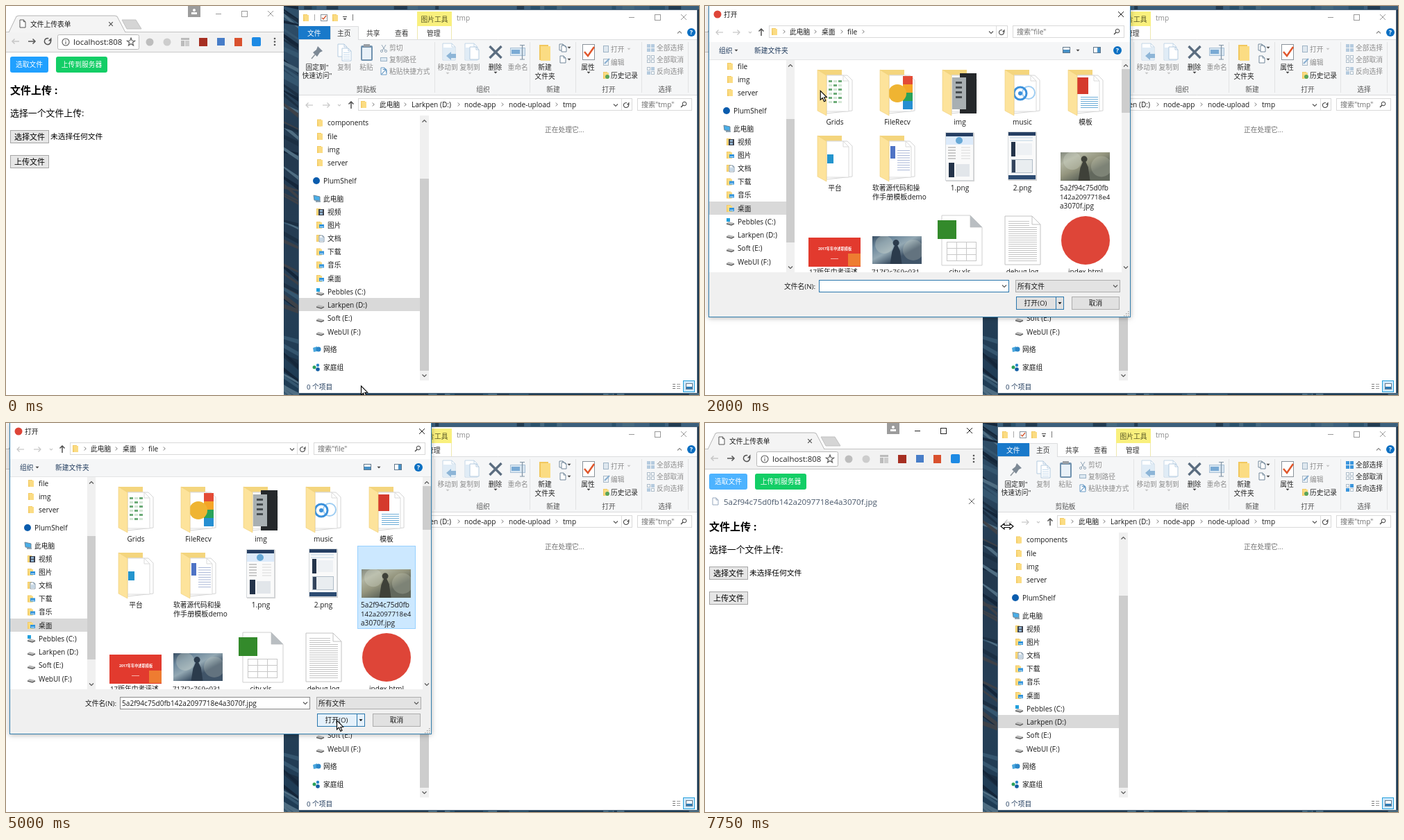
These frames come from a looping animation (998x561 px, 8000 ms). An HTML page with a canvas:

```html
<!DOCTYPE html>
<html lang="zh-CN">
<head>
<meta charset="utf-8">
<title>文件上传表单</title>
<style>
html, body { margin: 0; width: 100%; height: 100%; overflow: hidden; background: #fff; }
canvas { display: block; }
</style>
</head>
<body>
<canvas id="stage" width="998" height="561"></canvas>
<script>
const g = document.getElementById('stage').getContext('2d');
const LOOP = 8000, STEP = 250;
const FONT = '"Open Sans", "Noto Sans CJK SC", "Noto Sans CJK", sans-serif';
const DARK = '#1a1a1a', GREY = '#8c8c8c', PALE = '#c6c6c6', BLUE = '#1979ca', GOLD = '#fbdc83', FOCUS = '#2a77ad';
const FILE = '5a2f94c75d0fb142a2097718e4a3070f.jpg';

// --- drawing helpers ---
function rect(x, y, w, h, fill, stroke) {
  if (fill) { g.fillStyle = fill; g.fillRect(x, y, w, h); }
  if (stroke) { g.strokeStyle = stroke; g.lineWidth = 1; g.strokeRect(x + .5, y + .5, w - 1, h - 1); }
}
function round(x, y, w, h, r, fill, stroke) {
  g.beginPath(); g.roundRect(x, y, w, h, r);
  g.fillStyle = fill; g.fill();
  if (stroke) { g.strokeStyle = stroke; g.lineWidth = 1; g.stroke(); }
}
function trace(pts) {
  g.beginPath();
  for (let i = 0; i < pts.length; i += 2) g.lineTo(pts[i], pts[i + 1]);
}
function poly(pts, fill, stroke, w = 1) {
  trace(pts); g.closePath();
  if (fill) { g.fillStyle = fill; g.fill(); }
  if (stroke) { g.strokeStyle = stroke; g.lineWidth = w; g.stroke(); }
}
function line(pts, color, w = 1) {
  trace(pts); g.strokeStyle = color; g.lineWidth = w; g.stroke();
}
function disc(x, y, r, fill, stroke, w = 1) {
  g.beginPath(); g.arc(x, y, r, 0, 7);
  if (fill) { g.fillStyle = fill; g.fill(); }
  if (stroke) { g.strokeStyle = stroke; g.lineWidth = w; g.stroke(); }
}
// y is the vertical middle of the glyphs
function text(s, x, y, color = DARK, align = 'left', size = /[a-z]{2}/i.test(s) ? 10.1 : 9.75, weight = 400) {
  g.font = `${weight} ${size}px ${FONT}`;
  g.textAlign = align; g.fillStyle = color;
  g.fillText(s, x, y + size * .37);
}
function clip(x, y, w, h, draw) {
  g.save(); g.beginPath(); g.rect(x, y, w, h); g.clip(); draw(); g.restore();
}
function shade(x, y, w, h, ...colors) {
  const f = g.createLinearGradient(x, y, x + w * .3, y + h);
  colors.forEach((c, i) => f.addColorStop(i / (colors.length - 1), c));
  rect(x, y, w, h, f);
}
function seeded(n) {
  return () => (n = (n * 16807) % 2147483647) / 2147483647;
}

// --- small signs ---
const right = (x, y, c = '#777', s = 2.5) => line([x - s / 2, y - s, x + s / 2, y, x - s / 2, y + s], c);
const down = (x, y, c = '#555', s = 3) => line([x - s, y - s / 2, x, y + s / 2, x + s, y - s / 2], c, 1.1);
const up = (x, y, c = '#555') => down(x, y, c, -3);
const caret = (x, y, c = '#444') => poly([x - 2.5, y - 1.2, x + 2.5, y - 1.2, x, y + 1.6], c);
const cross = (x, y, s, c, w = 1) => { line([x - s, y - s, x + s, y + s], c, w); line([x + s, y - s, x - s, y + s], c, w); };
function arrow(x, y, dir, c, w = 1.2) {
  g.save(); g.translate(x, y); g.rotate(dir);
  line([-5, 0, 5, 0], c, w); line([1.5, -3.5, 5, 0, 1.5, 3.5], c, w);
  g.restore();
}
function reload(x, y, r, c, w = 1.2) {
  g.beginPath(); g.arc(x, y, r, -.5, 5); g.strokeStyle = c; g.lineWidth = w; g.stroke();
  poly([x + r + 1, y - r - 1, x + r + 1, y - .3, x + .8, y - .8], c);
}
function lens(x, y) { disc(x + 1, y - 1, 2.8, null, '#444'); line([x - 1, y + 1, x - 4, y + 4], '#444', 1.4); }
function help(x, y) { disc(x, y, 6, '#0a6fc2'); text('?', x, y, '#fff', 'center', 9, 700); }
function folder(x, y) { rect(x, y, 6, 10, '#f3cb65'); poly([x + 1, y + 1, x + 8, y + 1, x + 8, y + 10, x + 2, y + 10], GOLD); }
function sheet(x, y, w, h, edge = '#8a94a0', fold = w / 3) {
  poly([x, y, x + w - fold, y, x + w, y + fold, x + w, y + h, x, y + h], '#fff', edge);
  line([x + w - fold, y, x + w - fold, y + fold, x + w, y + fold], edge);
}
function winButtons(x, y, c) {
  line([x - 4, y + .5, x + 4, y + .5], c);
  rect(x + 33, y - 4, 9, 9, null, c);
  cross(x + 75, y, 4, c);
}
function scrollbar(x, y, w, h, top, bottom) {
  rect(x, y, w, h, '#f0f0f0');
  rect(x, top, w, bottom - top, '#cdcdcd');
  up(x + w / 2, y + 8); down(x + w / 2, y + h - 7);
}

// --- desktop ---
function desktop() {
  shade(400, 0, 598, 561, '#2f506b', '#22384e', '#263f56', '#1b3a54');
  const rnd = seeded(77);
  clip(400, 0, 22, 561, () => {
    for (let i = 0; i < 64; i++) {
      const y = rnd() * 580 - 10, s = 6 + rnd() * 18;
      poly([398, y, 424, y + s, 424, y + s + 2 + rnd() * 6, 398, y + 2 + rnd() * 5],
        ['#14263a', '#35566f', '#4f6d82', '#1b2f43', '#3d4148'][i % 5]);
    }
  });
  rect(421, 0, 577, 5, '#3a5f7c');
  for (let i = 0; i < 34; i++) {
    const x = 421 + rnd() * 570;
    rect(x, i % 2 ? 558 : 0, 4 + rnd() * 16, i % 2 ? 3 : 5, ['#203a50', '#44687f', '#28506b'][i % 3]);
  }
}

// --- browser ---
function browser(s) {
  rect(0, 0, 400, 561, '#fff');
  rect(0, 38, 400, 28, '#f2f2f2');
  line([0, 37.5, 400, 37.5], '#c4c4c4');
  poly([4, 38, 15, 15, 18, 14, 157, 14, 160, 15, 172, 38], '#f4f4f4');
  line([4, 38, 15, 15, 18, 14, 157, 14, 160, 15, 172, 38], '#b5b5b5');
  poly([167, 20, 187, 20, 195, 33, 174, 33], '#d5d5d5', '#c2c2c2');
  sheet(20, 20, 8, 11, '#555');
  text('文件上传表单', 35, 26);
  cross(151, 26, 2.8, '#555', 1.2);
  rect(262, 0, 18, 16, '#9c9c9c');
  disc(271, 6, 2, '#fff'); rect(267, 9, 8, 3, '#fff');
  winButtons(306, 11, s.fileChosen ? '#222' : '#999');
  line([0, 66.5, 400, 66.5], '#c9c9c9');

  arrow(14, 51, Math.PI, PALE, 1.5); arrow(37, 51, 0, '#555', 1.5); reload(60, 51, 4.5, '#555', 1.6);
  round(74.5, 41.5, 117, 21, 2, '#fff', '#b9b9b9');
  disc(86, 52, 5, null, '#555', 1.1); rect(85.5, 51, 1, 4, '#555'); rect(85.5, 49, 1, 1, '#555');
  text('localhost:808', 97, 52, '#222', 'left', 11.4);
  const star = [];
  for (let i = 0; i < 10; i++) {
    const a = i * Math.PI / 5 - Math.PI / 2, r = i % 2 ? 2.5 : 6;
    star.push(180 + r * Math.cos(a), 52 + r * Math.sin(a));
  }
  poly(star, null, '#555', 1.1);
  disc(207, 52, 5.5, '#bdbdbd'); disc(232, 52, 5.5, '#cdcdcd');
  rect(252, 46, 12, 3, '#bbb'); rect(252, 50, 5, 8, '#bbb'); rect(258, 50, 6, 8, '#ccc');
  rect(278, 46, 12, 12, '#a62f22'); rect(304, 46, 11, 11, '#477dc8');
  rect(329, 46, 11, 12, '#d9512e'); round(354, 45, 13, 13, 2, '#1d8ae4');
  [47, 51.5, 56].forEach(y => disc(387, y, 1.3, '#555'));

  round(6, 73, 55, 23, 3, s.blueLit ? '#4db3ff' : '#20a0ff');
  text('选取文件', 33.5, 84.5, '#fff', 'center');
  round(72, 73, 74, 23, 3, s.greenLit ? '#42d885' : '#13ce66');
  text('上传到服务器', 109, 84.5, '#fff', 'center');
  if (s.fileChosen) {
    sheet(11, 108, 8, 10, '#97a8be', 3);
    text(FILE, 27, 114, '#48576a', 'left', 11.5);
    if (s.rowHover) cross(384, 113, 4, '#666');
  }
  const dy = s.fileChosen ? 28 : 0;
  text('文件上传 :', 6, 121.5 + dy, '#000', 'left', 15, 700);
  text('选择一个文件上传:', 6, 154.5 + dy, '#000', 'left', 12.9);
  [['选择文件', 179], ['上传文件', 215]].forEach(([label, y]) => {
    rect(6, y + dy, 56, 19, '#e6e6e6', '#a6a6a6');
    text(label, 34, y + 9.5 + dy, '#000', 'center', 11);
  });
  text('未选择任何文件', 64, 188.5 + dy, '#000', 'left', 10.75);
}

// --- shared navigation tree ---
const TREE = [
  ['components', 168.5, 'folder'], ['file', 188, 'folder'], ['img', 207, 'folder'], ['server', 226, 'folder'],
  ['PlumShelf', 252, 'cloud'], ['此电脑', 278, 'pc'],
  ['视频', 297, 'film'], ['图片', 316, 'lib'], ['文档', 335, 'doc'], ['下载', 354.5, 'lib'],
  ['音乐', 373.5, 'lib'], ['桌面', 393, 'lib'],
  ['Pebbles (C:)', 412, 'system'], ['Larkpen (D:)', 431, 'drive'], ['Soft (E:)', 450.5, 'drive'], ['WebUI (F:)', 470, 'drive'],
  ['网络', 495, 'net'], ['家庭组', 521, 'group']
];
const treeIcon = {
  folder: (x, y) => folder(x + 1, y - 5),
  cloud: (x, y) => disc(x, y, 5, '#0a5cad'),
  pc(x, y) { poly([x - 4, y - 5, x + 5, y - 3, x + 5, y + 3, x - 3, y + 2], '#4aaee8', '#6b8496'); rect(x - 1, y + 3, 7, 2, '#8fa4b3'); },
  film(x, y) { folder(x, y - 5); rect(x + 3, y - 4, 8, 9, '#3b3f4a'); rect(x + 5, y - 3, 4, 3, '#8fb1cf'); rect(x + 5, y + 1, 4, 3, '#8fb1cf'); },
  lib(x, y) { folder(x, y - 5); rect(x + 4, y - 1, 7, 5, '#3294db'); rect(x + 5, y + 2, 5, 1, '#cfe8f9'); },
  doc(x, y) { folder(x, y - 5); sheet(x + 4, y - 4, 7, 9, '#8398aa', 2); line([x + 5, y, x + 10, y], '#7aa2c4'); line([x + 5, y + 2.5, x + 10, y + 2.5], '#7aa2c4'); },
  drive(x, y) { poly([x, y + 2, x + 3, y, x + 11, y + 2, x + 11, y + 4, x + 7, y + 5, x, y + 3], '#b8b8b8'); line([x, y + 3, x + 7, y + 5, x + 11, y + 3], '#555', 1.3); },
  system(x, y) { treeIcon.drive(x, y); rect(x, y - 5, 5, 5, '#21a0dd'); },
  net(x, y) { poly([x - 5, y - 2, x + 1, y - 4, x + 1, y + 3, x - 4, y + 4], '#4ba7dc'); disc(x + 3, y, 3.5, '#2b86c8'); },
  group(x, y) { disc(x - 3, y, 2.5, '#2ca35c'); disc(x + 2, y - 3, 2.2, '#2b86c8'); disc(x + 2, y + 3, 2.8, '#125fa5'); }
};
function tree(dx, dy, first, last, chosen, width, chevrons) {
  TREE.slice(first, last).forEach(([label, y0, kind]) => {
    const y = y0 + dy, root = /cloud|pc|net|group/.test(kind);
    if (label === chosen) rect(422 + dx, Math.floor(y - 9.5), width, 19, '#d9d9d9');
    treeIcon[kind](447 + dx, y);
    text(label, (root ? 457 : 463) + dx, y);
    if (!chevrons || kind === 'folder') return;
    g.globalAlpha = chevrons;
    const x = (root ? 431 : 438) + dx;
    kind === 'pc' ? down(x, y, '#555') : right(x, y, '#999', 3);
    g.globalAlpha = 1;
  });
}

// --- file explorer ---
function ribbon(s) {
  rect(422, 48, 573, 81, '#f5f6f7');
  line([422, 48.5, 995, 48.5], '#dcdddf'); line([422, 128.5, 995, 128.5], '#dadbdc');
  rect(467, 29, 40, 20, '#f5f6f7'); line([467.5, 48, 467.5, 29.5, 507.5, 29.5, 507.5, 48], '#dcdddf');
  rect(421, 29, 46, 19, BLUE);
  rect(592, 8, 50, 21, '#f9f07d'); line([592.5, 29, 592.5, 48], '#eee8b0'); line([641.5, 29, 641.5, 48], '#eee8b0');
  text('图片工具', 617, 19, '#555424', 'center');
  text('文件', 434, 39, '#fff');
  [['主页', 477], ['共享', 519], ['查看', 560], ['管理', 606]].forEach(([n, x]) => text(n, x, 39, '#333'));
  up(970, 38, '#888'); help(987, 38);
  [617, 754, 820, 915, 982].forEach(x => line([x + .5, 52, x + .5, 125], '#e2e3e4'));
  [['剪贴板', 519], ['组织', 687], ['新建', 788], ['打开', 868], ['选择', 949]].forEach(([n, x]) => text(n, x, 120, '#555', 'center'));
  [['固定到"', 448, 88, 1], ['快速访问"', 448, 100.5, 1], ['复制', 487, 88], ['粘贴', 519, 88], ['移动到', 636, 88], ['复制到', 668, 88],
    ['删除', 704.5, 88, 1], ['重命名', 737, 88], ['新建', 776, 88, 1], ['文件夹', 776, 101, 1], ['属性', 838, 88, 1]]
    .forEach(([n, x, y, on]) => text(n, x, y, on ? '#222' : GREY, 'center'));
  [['剪切', 60.5], ['复制路径', 77], ['粘贴快捷方式', 94]].forEach(([n, y]) => text(n, 552, y, GREY));
  [['打开', 62], ['编辑', 81], ['历史记录', 100]].forEach(([n, y], i) => text(n, 871, y, i > 1 ? '#222' : GREY));

  // pin, copy, paste
  poly([449, 58, 456, 65, 452, 67, 448, 73, 442, 67, 447, 63], '#7d8995'); line([445, 70, 440, 76], '#8b949c', 1.5);
  sheet(478, 55, 13, 18, '#b4cbe0', 4); sheet(484, 61, 13, 18, '#b4cbe0', 4);
  for (let y = 67; y < 77; y += 3) line([486, y + .5, 495, y + .5], '#c3d9ec');
  round(511, 57, 17, 22, 2, '#7192af'); rect(513, 60, 13, 17, '#e9f1f8'); rect(515, 55, 9, 4, '#9a9fa4');
  line([541, 56, 546, 64], '#93a7b8'); line([547, 56, 542, 64], '#93a7b8'); disc(541, 65, 1.6, null, '#93a7b8'); disc(547, 65, 1.6, null, '#93a7b8');
  rect(539, 74, 10, 6, '#dce8f2', '#9db4c7'); sheet(540, 89, 8, 10, '#6a9cc6', 3); arrow(544, 95, -.8, '#6a9cc6');
  // move, copy to, delete, rename
  [628, 660].forEach(x => { sheet(x + 1, 54, 18, 24, '#c2d6e7', 5); rect(x + 2, 60, 16, 17, '#e0ecf6'); });
  poly([634, 72, 641, 66, 641, 69, 648, 69, 648, 75, 641, 75, 641, 78], '#8db5d7');
  sheet(668, 59, 13, 18, '#b4cbe0', 4);
  cross(705, 66.5, 8.5, '#5b6d80', 3.4);
  rect(726, 60, 22, 12, '#d9e7f2', '#aac2d7'); rect(728, 63, 12, 6, '#7aaad4');
  line([740, 56.5, 747, 56.5], '#8295a6'); line([743.5, 57, 743.5, 77], '#8295a6', 1.3); line([740, 77, 747, 77], '#8295a6');
  [[636, 97, PALE], [668, 97, PALE], [705, 96], [839, 96], [811, 60], [811, 77], [897, 62, PALE]].forEach(a => caret(...a));
  // new, properties, open
  rect(768, 56, 13, 22, '#f1c75e'); poly([770, 58, 784, 58, 784, 79, 770, 79], GOLD);
  sheet(797, 55, 7, 9, '#718699', 2); sheet(800, 57, 7, 9, '#718699', 2); sheet(798, 72, 8, 10, '#718699', 3);
  rect(830, 55, 18, 23, '#fff', '#8a929a'); line([833, 66, 838, 72, 847, 59], '#e0562b', 2.5);
  rect(860, 57, 8, 10, '#dfe8ef', '#9eb3c5'); rect(860, 76, 8, 10, '#eef3f7', '#a8b8c6'); line([862, 83, 869, 76], '#87add0', 2);
  folder(860, 95); disc(866, 102, 3, '#5aa45a');
  // selection group
  [['全部选择', 60.5], ['全部取消', 77], ['反向选择', 94]].forEach(([n, y], i) => {
    text(n, 937, y, s.fileChosen ? '#222' : GREY);
    const c = s.fileChosen ? '#3c96dc' : '#b5cbdf';
    for (let k = 0; k < 4; k++) {
      const solid = i === 0 || (i === 2 && (k === 1 || k === 2));
      rect(923 + (k % 2) * 6, Math.floor(y - 5.5) + (k >> 1) * 6, 5, 5, solid ? c : '#f8fafc', solid ? null : '#aebdca');
    }
  });
}
function explorer(s) {
  rect(421, 5, 575, 554, '#fff', '#52697e');
  folder(428, 12); line([444.5, 12, 444.5, 21], '#aaa');
  rect(453, 12, 10, 10, '#fff', '#8a929a'); line([455, 17, 457, 19, 461, 14], '#d2562f', 1.4);
  folder(470, 12); line([485, 15.5, 491, 15.5], '#444'); caret(488, 19); line([499.5, 12, 499.5, 21], '#777');
  text('tmp', 649, 17, '#888');
  winButtons(901, 16, '#999');
  ribbon(s);
  arrow(437, 143, Math.PI, PALE); arrow(461, 143, 0, PALE); down(480, 143, PALE, 2); arrow(497, 143, -Math.PI / 2, '#444', 1.4);
  rect(507, 133, 395, 18, '#fff', '#d9d9d9'); folder(511, 137);
  [529, 575, 652, 715, 793].forEach(x => right(x, 142));
  [['此电脑', 538], ['Larkpen (D:)', 584], ['node-app', 660], ['node-upload', 724], ['tmp', 802]].forEach(([n, x]) => text(n, x, 142));
  down(878, 143); line([886.5, 134, 886.5, 150], '#ddd'); reload(893, 143, 3.5, '#555');
  rect(909, 133, 79, 18, '#fff', '#d9d9d9'); text('搜索"tmp"', 915, 142.5, '#6d6d6d'); lens(976, 142);
  tree(0, 0, 0, 18, 'Larkpen (D:)', 174, s.treeChevrons);
  scrollbar(596, 158, 13, 382, 249, 526);
  text('正在处理它...', 776, 178, '#6d6d6d');
  text('0 个项目', 433, 549, '#1e395b');
  for (let y = 545; y < 554; y += 3) { line([960, y + .5, 964, y + .5], '#777'); line([966, y + .5, 971, y + .5], '#999'); }
  rect(975, 540, 17, 17, '#cce8ff', '#26a0da'); rect(979, 544, 10, 9, '#fff', '#64788a'); rect(980, 549, 8, 3, '#2b7cb9');
}

// --- open dialog ---
function bigFolder(cx, y, content) {
  rect(cx - 25, y + 1, 35, 58, '#f4d57d');
  poly([cx - 12, y + 9, cx + 18, y + 9, cx + 25, y + 16, cx + 25, y + 60, cx - 12, y + 64], '#fff', '#d4d4d4');
  sheet(cx - 12, y + 9, 32, 52, '#dadada', 8);
  content(cx, y);
  poly([cx - 25, y + 1, cx - 12, y + 9, cx - 12, y + 67, cx - 25, y + 60], '#fde39b', '#efcf79', .6);
}
const contents = [
  (x, y) => { for (let r = 0; r < 6; r++) for (let c = 0; c < 3; c++) rect(x - 9 + c * 7, y + 16 + r * 6, 5, 3, (r + c) % 2 ? '#d3e6d5' : '#6dac78'); },
  (x, y) => { ['#e34b36', '#f5a527', '#29a35a', '#268fd2'].forEach((c, i) => rect(x + 8, y + 10 + i * 12, 14, 12, c)); disc(x, y + 35, 13, '#efb432'); },
  (x, y) => { rect(x, y + 6, 24, 58, '#25282b'); rect(x - 11, y + 12, 20, 46, '#a8afb2'); for (let i = 0; i < 4; i++) rect(x - 6, y + 18 + i * 7, 9, 3, '#474d50'); },
  (x, y) => { disc(x + 9, y + 34, 9, null, '#9fcdf2', 2); disc(x - 3, y + 35, 9, null, '#3b91dc', 3); disc(x - 3, y + 35, 3, '#3b91dc'); },
  (x, y) => { rect(x - 12, y + 12, 16, 24, '#d53a2d'); for (let i = 0; i < 6; i++) line([x - 7, y + 40.5 + i * 3, x + 18, y + 40.5 + i * 3], '#6cacd7'); },
  (x, y) => { rect(x - 11, y + 28, 9, 13, '#2395ce'); },
  (x, y) => { rect(x - 10, y + 16, 7, 18, '#4f73c5'); for (let i = 0; i < 9; i++) line([x, y + 22.5 + i * 3.5, x + 18, y + 22.5 + i * 3.5], '#aab7d7'); }
];
function phone(x, y, h, body) {
  rect(x + 1, y + 1, 41, h, '#d0d0d0'); rect(x, y, 41, h, '#fafafa', '#d5d9dc'); rect(x + 1, y + 1, 39, 5, '#263f63');
  body();
}
function photo(x, y, w, h, tones, figure) {
  shade(x, y, w, h, ...tones);
  clip(x, y, w, h, () => {
    disc(x + w * .24, y + h * .3, 13, 'rgba(220,224,212,.3)');
    disc(x + w * .83, y + h * .5, 15, 'rgba(225,226,210,.22)');
    poly([x + w * .36, y + h, x + w * .4, y + h * .55, x + w * .48, y + h * .22, x + w * .56, y + h * .52, x + w * .6, y + h], figure);
    disc(x + w * .48, y + h * .24, 4.5, figure);
  });
}
function files(s) {
  if (s.picked || s.fileHover) rect(506, 177, 84, 120, s.picked ? '#cce8ff' : '#e5f3ff', s.picked ? '#99d1ff' : null);
  const cols = [187, 277, 367, 457, 548];
  ['Grids', 'FileRecv', 'img', 'music', '模板'].forEach((n, i) => {
    bigFolder(cols[i], 91, contents[i]); text(n, cols[i], 167.5, DARK, 'center');
  });
  bigFolder(187, 186, contents[5]); text('平台', 187, 262, DARK, 'center');
  bigFolder(277, 186, contents[6]); text('软著源代码和操', 241, 262); text('作手册模板demo', 241, 275);
  phone(346, 182, 70, () => {
    rect(347, 188, 39, 12, '#dceafa'); disc(366, 194, 5, '#66a8d6');
    for (let y = 204; y < 222; y += 4) { line([350, y, 361, y], '#999'); line([369, y, 382, y], '#d8d8d8'); }
    rect(351, 226, 8, 21, '#24344a'); rect(361, 228, 20, 18, '#e2e6ea');
  });
  phone(436, 181, 70, () => {
    for (let y = 190; y < 196; y += 4) line([439, y, 472, y], '#bcd2e3');
    rect(441, 196, 6, 21, '#24344a'); rect(449, 198, 22, 17, '#eef1f4');
    rect(441, 221, 31, 20, '#e9edf0', '#b0bdc8'); rect(442, 222, 5, 18, '#33445c'); rect(437, 244, 39, 6, '#2d4c72');
  });
  text('1.png', 367, 262, DARK, 'center'); text('2.png', 457, 262, DARK, 'center');
  photo(512, 211, 71, 41, ['#848a7f', '#b0b3a0', '#95967f', '#62685d'], '#3f4139');
  [FILE.slice(0, 13), FILE.slice(13, 26), FILE.slice(26)].forEach((n, i) => text(n, 511, 262 + i * 13));

  rect(149, 334, 75, 42, '#e23a2e'); text('2017年年中述职模板', 187, 350, '#fff', 'center', 5.2, 700);
  rect(181, 364, 11, 1, '#f5b2aa'); rect(206, 357, 18, 18, '#ee7c31');
  photo(241, 332, 71, 40, ['#3a5065', '#6d889c', '#93a8b3', '#405468'], '#2b3b4c');
  sheet(341, 302, 58, 72, '#cfcfcf', 17); poly([382, 302, 399, 319, 382, 319], '#b9bec2');
  rect(335, 309, 27, 27, '#338a2b');
  for (let r = 0; r < 3; r++) for (let c = 0; c < 3; c++) rect(348 + c * 14, 340 + r * 9, 15, 10, null, '#c8c8c8');
  sheet(432, 303, 51, 70, '#c2c2c2', 12);
  for (let y = 310; y < 370; y += 3) line([437, y + .5, y < 318 ? 467 : 478, y + .5], '#c4c4c4');
  disc(548, 338, 35, '#de4538');
  text('17版年中考评述', 150, 383); text('717f2c769e931', 240, 383);
  [['city.xls', 367], ['debug.log', 457], ['index.html', 548]].forEach(([n, x]) => text(n, x, 383, DARK, 'center'));
}
function dialog(s) {
  g.save(); g.shadowColor = 'rgba(0,0,0,.3)'; g.shadowBlur = 7; g.shadowOffsetY = 1;
  rect(5, -2, 608, 451, '#fff'); g.restore();
  rect(5, -2, 608, 451, '#fff', '#337fae');
  disc(18, 12, 5.5, '#de4538'); text('打开', 27, 12); cross(599, 12, 4, '#222');
  arrow(21, 38, Math.PI, PALE); arrow(45, 38, 0, PALE); down(65, 38, PALE, 2); arrow(81, 38, -Math.PI / 2, '#444', 1.4);
  rect(92, 28, 344, 18, '#fff', '#d9d9d9'); folder(96, 32);
  [114, 159, 197, 228].forEach(x => right(x, 37));
  [['此电脑', 122], ['桌面', 168], ['file', 205]].forEach(([n, x]) => text(n, x, 37));
  down(412, 38); line([419.5, 29, 419.5, 45], '#ddd'); reload(427, 38, 3.5, '#555');
  rect(443, 28, 161, 18, '#fff', '#d9d9d9'); text('搜索"file"', 449, 37.5, '#6d6d6d'); lens(593, 37);
  rect(6, 52, 606, 25, '#f5f6f7'); line([6, 77.5, 612, 77.5], '#e4e5e6');
  text('组织', 20, 64, '#1e395b'); caret(45, 64); text('新建文件夹', 71, 64, '#1e395b');
  rect(515, 59, 11, 9, '#fff', '#60778b'); rect(516, 63, 9, 4, '#4791c7'); caret(537, 64);
  rect(559, 59, 11, 9, '#fff', '#60778b'); rect(565, 60, 4, 7, '#4791c7'); help(594, 64);
  tree(-416, -101, 1, 16, '桌面', 111, s.dialogChevrons);
  scrollbar(117, 78, 12, 306, 163, 341);
  clip(130, 78, 470, 306, () => files(s));
  scrollbar(600, 78, 12, 306, 91, 154);
  rect(6, 384, 606, 64, '#f0f0f0');
  text('文件名(N):', 159, 404, DARK, 'right');
  rect(164, 395, 274, 18, '#fff', s.openHover ? '#8a8a8a' : FOCUS); down(431, 404);
  if (s.picked) text(FILE, 167, 404);
  if (s.inputCaret) line([166.5, 398, 166.5, 410], '#000');
  rect(447, 395, 151, 18, '#e3e3e3', '#adadad'); text('所有文件', 450, 404); down(591, 404);
  rect(448, 419, 69, 19, s.openHover ? '#e5f1fb' : '#e1e1e1', FOCUS);
  line([505.5, 420, 505.5, 437], FOCUS); text('打开(O)', 476, 428.5, DARK, 'center'); caret(511, 428.5, '#000');
  rect(528, 419, 69, 19, '#e1e1e1', '#adadad'); text('取消', 562.5, 428.5, DARK, 'center');
  for (let i = 0; i < 3; i++) for (let k = 0; k <= i; k++) rect(609 - k * 3, 440 + i * 3, 1.5, 1.5, '#aaa');
}

// --- pointer ---
const PATH = [
  [0, 511, 548], [1250, 33, 85], [1750, 33, 85], [2500, 545, 229], [2750, 545, 229], [3250, 538, 247],
  [4000, 538, 247], [5000, 476, 429], [5250, 476, 429], [5750, 171, 155], [6250, 120, 87],
  [6750, 104, 82], [7250, 104, 82], [7750, 435, 149], [LOOP, 435, 149]
];
function pointerAt(t) {
  const i = PATH.findIndex(p => p[0] > t);
  const [t0, x0, y0] = PATH[i - 1], [t1, x1, y1] = PATH[i];
  const k = (t - t0) / (t1 - t0), e = k * k * (3 - 2 * k);
  return [x0 + (x1 - x0) * e, y0 + (y1 - y0) * e];
}
function pointer(t) {
  const [x, y] = pointerAt(t);
  g.save(); g.translate(x, y);
  if (t >= 7750) {
    poly([-9, 0, -4, -4, -4, -1.5, 4, -1.5, 4, -4, 9, 0, 4, 4, 4, 1.5, -4, 1.5, -4, 4], '#fff', '#000', 1.1);
  } else {
    poly([.5, 0, .5, 13, 3.5, 10.2, 5.8, 15.5, 8, 14.5, 5.8, 9.4, 9.6, 9.2], '#fff', '#000', 1.1);
  }
  g.restore();
}

function stateAt(t) {
  const within = (a, b) => t >= a && t < b;
  return {
    blueLit: t >= 1250,
    greenLit: within(6250, 7500),
    open: within(2000, 5250),
    fileHover: t >= 2500,
    picked: t >= 3250,
    inputCaret: within(3250, 4750) && t % 1000 < 500,
    openHover: t >= 4750,
    fileChosen: t >= 5250,
    rowHover: t >= 7500,
    dialogChevrons: within(2250, 3000) ? 1 : within(3000, 3250) ? .5 : 0,
    treeChevrons: within(500, 1000) || within(5250, 6500) ? 1 : within(6500, 6750) ? .5 : 0
  };
}
function draw(t) {
  const s = stateAt(t);
  desktop(); browser(s); explorer(s);
  if (s.open) dialog(s);
  pointer(t);
}

const start = performance.now();
let shown = -1;
function tick() {
  const t = Math.floor(((performance.now() - start) % LOOP) / STEP) * STEP;
  if (t !== shown) draw(shown = t);
  requestAnimationFrame(tick);
}
tick();
</script>
</body>
</html>
```
